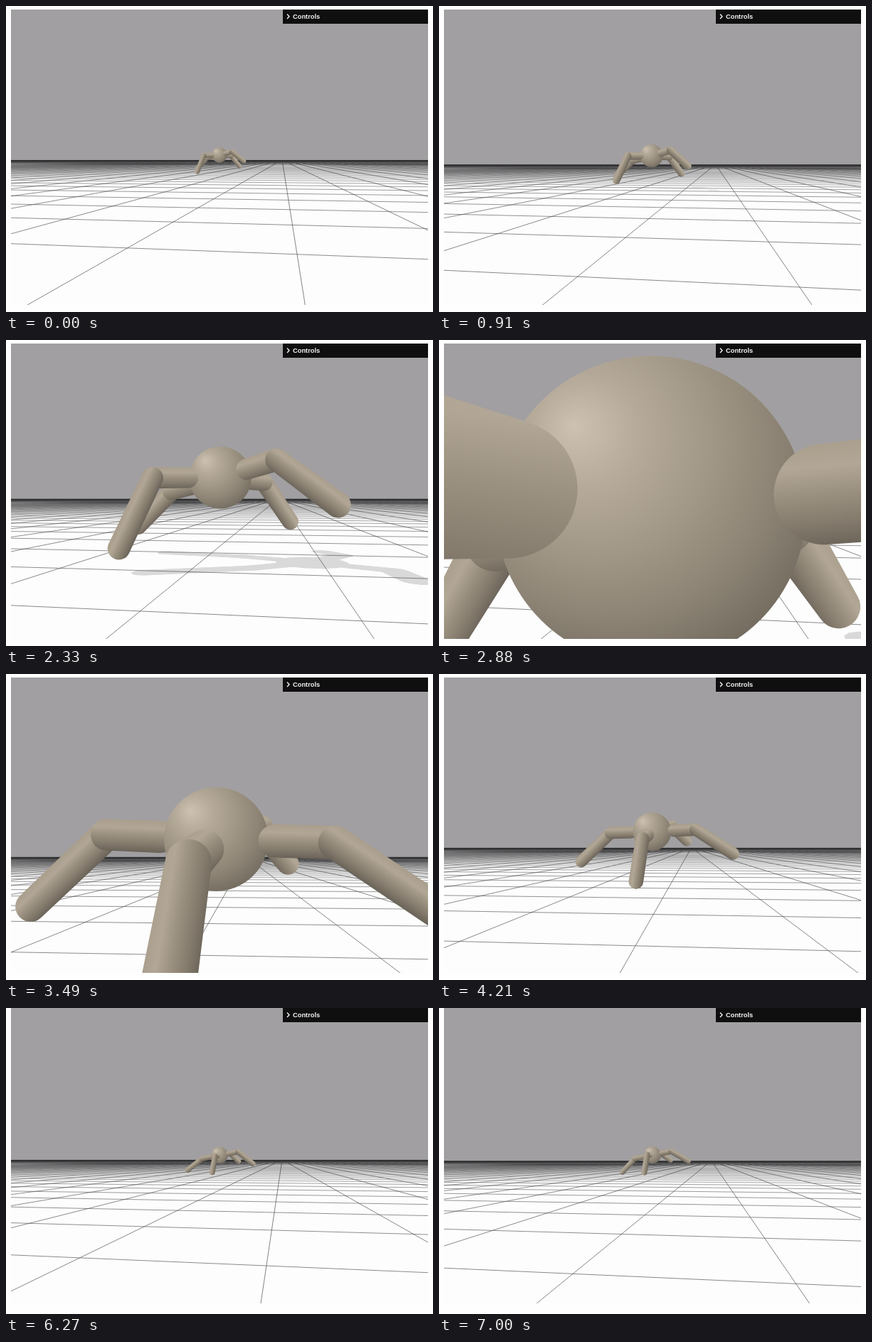
An HTML page with a canvas that plays this animation: 600x431 px, repeating every 7030 ms.

```html
<!DOCTYPE html>
<html lang="en">
<head>
<meta charset="utf-8">
<title>Walker viewer</title>
<style>
  html, body { margin: 0; width: 100%; height: 100%; overflow: hidden; background: #fefefe; }
  #stage { position: relative; width: 600px; height: 431px; overflow: hidden; }
  canvas { position: absolute; left: 0; top: 0; }
  #panel { position: absolute; left: 389px; top: 5px; width: 204px; height: 20px; background: #0f0f10; }
  #panel svg { position: absolute; left: 0; top: 0; }
  #panel text { font: bold 9.3px Arial, "Liberation Sans", sans-serif; fill: #f2f2f2; }
</style>
</head>
<body>
<div id="stage">
  <canvas id="view" width="600" height="431"></canvas>
  <div id="panel">
    <svg width="204" height="20">
      <path d="M6 6.6 L9 9.8 L6 13" fill="none" stroke="#f2f2f2" stroke-width="1.4"/>
      <text x="14" y="13">Controls</text>
    </svg>
  </div>
</div>
<script>
const ctx = document.getElementById('view').getContext('2d');
const panel = document.getElementById('panel');
const LOOP = 7.03, SHIFT_AT = 4.74, STRIDE = 0.47;
const FOCAL = 550, EYE = 0.53, MID_X = 300, MID_Y = 213, NEAR = 0.06;
const TORSO = 0.25, LIMB = 0.08, REACH = 0.566, GAZE_LAG = 0.08;

const rad = deg => deg * Math.PI / 180;
const clamp01 = u => Math.min(1, Math.max(0, u));
const smooth = (from, to, t) => {
  const u = clamp01((t - from) / (to - from));
  return u * u * (3 - 2 * u);
};
const lerp = (a, b, u) => a + (b - a) * u;
const mix = (a, b, u) => a.map((v, i) => lerp(v, b[i], u));

// Values at time t along key points of the form [time, ...values].
function track(points, t) {
  let i = 0;
  while (i < points.length - 2 && points[i + 1][0] <= t) i++;
  const [a, b] = [points[i], points[i + 1]];
  return mix(a, b, clamp01((t - a[0]) / (b[0] - a[0]))).slice(1);
}

// Walker route: time, x, height, z, height the camera aims at.
const route = [
  [0, -1.12, 0.69, 12.5, 0.62],
  [0.91, -0.73, 0.72, 8.63, 0.7],
  [2.33, 0.18, 0.7, 3.36, 0.59],
  [2.88, 0.535, 0.51, 0.91, 0.545],
  [4.21, 1.21, 0.74, -4.99, 0.82],
  [5.58, 2.5, 0.63, -10.76, 0.63],
  [7, 3.08, 0.7, -14.7, 0.68]
];
// The camera waits while the walker passes, then trails it.
const cameraRoute = [
  [0, 0.918, -0.235], [0.35, 0.642, 0.235], [2.97, 0.642, 0.235],
  [3.1, 0.7, 0.09], [5.9, 0.7, 0.09], [7, 1.36, -3.245]
];
const legs = [
  { angle: 216, bend: [-64, -22], turnAt: 2.4 },
  { angle: -36, bend: [-34, -43], turnAt: 2.4 },
  { angle: 150, bend: [-36, -33], turnAt: 2.9 },
  { angle: 54, bend: [-42, -57], turnAt: 2.9 }
];

function cameraAt(t) {
  const [x, z] = track(cameraRoute, t);
  const [gx, , gz, gaze] = track(route, t - GAZE_LAG);
  const dx = gx - x, dz = gz - z, dist = Math.hypot(dx, dz) || 1;
  return {
    x, z, sin: dx / dist, cos: dz / dist,
    horizon: MID_Y + FOCAL * (gaze - EYE) / Math.max(0.5, dist)
  };
}

function poseAt(t) {
  const torso = track(route, t).slice(0, 3);
  const step = (from, angle, lift, length) => [
    from[0] + length * Math.cos(lift) * Math.cos(angle),
    from[1] + length * Math.sin(lift),
    from[2] + length * Math.cos(lift) * Math.sin(angle)
  ];
  const tiltTo = -46 - 30 * Math.max(0, t - 2.33);
  const limbs = legs.flatMap((leg, i) => {
    const turn = smooth(leg.turnAt, leg.turnAt + 0.48, t);
    const swing = Math.sin(2 * Math.PI * (t - 2.33) / STRIDE) * (i % 2 ? 1 : -1);
    const angle = rad(leg.angle + 30 * turn + 3 * swing);
    const lift = rad(11) * Math.cos(angle - rad(tiltTo));
    const knee = step(torso, angle, lift, REACH);
    const foot = step(knee, angle, rad(lerp(...leg.bend, turn) + 8 * swing), REACH);
    return [[mix(torso, knee, 0.5), knee], [knee, foot]];
  });
  return { torso, limbs };
}

// View space: x right, y down from the eye, z away.
function toView(cam, [x, y, z]) {
  const dx = x - cam.x, dz = z - cam.z;
  return [dx * cam.cos - dz * cam.sin, EYE - y, dx * cam.sin + dz * cam.cos];
}
const project = (cam, v) => [MID_X + FOCAL * v[0] / v[2], cam.horizon + FOCAL * v[1] / v[2]];

function clipNear(a, b, near) {
  if (a[2] < near && b[2] < near) return null;
  const cut = (p, q) => p[2] >= near ? p : mix(p, q, (near - p[2]) / (q[2] - p[2]));
  return [cut(a, b), cut(b, a)];
}

function addStops(gradient, colors) {
  colors.forEach((color, i) => gradient.addColorStop(i / (colors.length - 1), color));
  return gradient;
}

function drawGrid(cam) {
  const range = 34, far = 60;
  ctx.lineWidth = 0.85;
  const line = (p, q, gap) => {
    const seg = clipNear(toView(cam, p), toView(cam, q), 0.2);
    if (!seg) return;
    const [a, b] = seg.map(v => project(cam, v));
    ctx.strokeStyle = `rgba(68,68,70,${Math.max(0, 0.78 * (1 - gap / range))})`;
    ctx.beginPath();
    ctx.moveTo(...a);
    ctx.lineTo(...b);
    ctx.stroke();
  };
  const cx = Math.round(cam.x), cz = Math.round(cam.z);
  for (let k = -range; k <= range; k++) {
    line([cx + k, 0, cz - far], [cx + k, 0, cz + far], Math.abs(cx + k - cam.x));
    line([cx - far, 0, cz + k], [cx + far, 0, cz + k], Math.abs(cz + k - cam.z));
  }
}

function drawHaze(y) {
  const depth = 26;
  const alphas = Array.from({ length: 14 }, (_, i) => 0.92 * Math.exp(-i * i / 14));
  alphas[13] = 0;
  ctx.fillStyle = addStops(ctx.createLinearGradient(0, y, 0, y + depth),
    alphas.map(a => `rgba(18,18,20,${a})`));
  ctx.fillRect(0, y, 600, depth);
}

function drawShadow(cam, { torso, limbs }, strength) {
  if (!strength) return;
  const tone = Math.round(253 - 36 * strength);
  ctx.fillStyle = `rgb(${tone},${tone},${tone})`;
  const disc = ([x, y, z], r) => Array.from({ length: 14 }, (_, i) => {
    const a = i * Math.PI / 7;
    return toView(cam, [x + 1.05 * y + r * Math.cos(a), 0, z + 0.3 * y + r * Math.sin(a)]);
  });
  const fill = points => {
    if (points.some(v => v[2] < 0.2)) return;
    ctx.beginPath();
    points.forEach(v => ctx.lineTo(...project(cam, v)));
    ctx.fill();
  };
  fill(disc(torso, TORSO * 1.2));
  for (const pair of limbs) {
    const [p, q] = pair.map(end => disc(end, LIMB * 1.3));
    fill(p);
    fill(q);
    p.forEach((v, i) => {
      const j = (i + 1) % p.length;
      fill([v, p[j], q[j], q[i]]);
    });
  }
}

function drawLimb(cam, a, b) {
  const seg = clipNear(a, b, NEAR);
  if (!seg) return;
  const [p, q] = seg.map(v => project(cam, v));
  const [r1, r2] = seg.map(v => FOCAL * LIMB / v[2]);
  const dx = q[0] - p[0], dy = q[1] - p[1], len = Math.hypot(dx, dy) || 1e-6;
  const r = Math.max(r1, r2);
  const lit = dy * 0.4 - dx > 0 ? -r / len : r / len;
  const nx = dy * lit, ny = -dx * lit;
  const mx = (p[0] + q[0]) / 2, my = (p[1] + q[1]) / 2;
  ctx.fillStyle = addStops(ctx.createLinearGradient(mx + nx, my + ny, mx - nx, my - ny),
    ['#a99e8c', '#b2a796', '#9a907f', '#847b6d', '#696257']);
  ctx.beginPath();
  if (len <= Math.abs(r1 - r2)) {
    ctx.arc(...(r1 > r2 ? p : q), r, 0, 7);
  } else {
    const turn = Math.atan2(dy, dx), off = Math.acos((r1 - r2) / len);
    ctx.arc(...p, r1, turn + off, turn - off + 2 * Math.PI);
    ctx.arc(...q, r2, turn - off, turn + off);
  }
  ctx.fill();
}

function drawTorso(cam, v) {
  if (v[2] < TORSO + 0.03) return;
  const [x, y] = project(cam, v);
  const r = FOCAL * TORSO / Math.sqrt(v[2] ** 2 - TORSO ** 2);
  ctx.fillStyle = addStops(
    ctx.createRadialGradient(x - r * 0.5, y - r * 0.55, 0, x - r * 0.2, y - r * 0.35, r * 1.45),
    ['#cdc2b1', '#b5aa99', '#a29887', '#8d8475', '#716a5e']);
  ctx.beginPath();
  ctx.arc(x, y, r, 0, 7);
  ctx.fill();
}

function drawWalker(cam, pose) {
  const torso = toView(cam, pose.torso);
  const parts = pose.limbs.map(pair => {
    const [a, b] = pair.map(p => toView(cam, p));
    return { z: (a[2] + b[2]) / 2, draw: () => drawLimb(cam, a, b) };
  });
  parts.push({ z: torso[2], draw: () => drawTorso(cam, torso) });
  parts.sort((a, b) => b.z - a.z).forEach(part => part.draw());
}

function render(t) {
  const cam = cameraAt(t), pose = poseAt(t);
  const lift = t >= SHIFT_AT ? -5 : 0;
  panel.style.top = 5 + lift + 'px';
  ctx.clearRect(0, 0, 600, 431);
  ctx.save();
  ctx.translate(0, lift);
  ctx.beginPath();
  ctx.rect(7, 5, 586, 416);
  ctx.clip();
  ctx.fillStyle = '#a19fa1';
  ctx.fillRect(0, 0, 600, 431);
  ctx.fillStyle = '#fdfdfd';
  ctx.fillRect(0, cam.horizon, 600, 431);
  drawShadow(cam, pose, t < 3 ? clamp01(t - 0.5) : 0);
  drawGrid(cam);
  drawHaze(cam.horizon);
  drawWalker(cam, pose);
  ctx.restore();
}

const start = performance.now();
function tick() {
  render((performance.now() - start) / 1000 % LOOP);
  requestAnimationFrame(tick);
}
tick();
</script>
</body>
</html>
```
